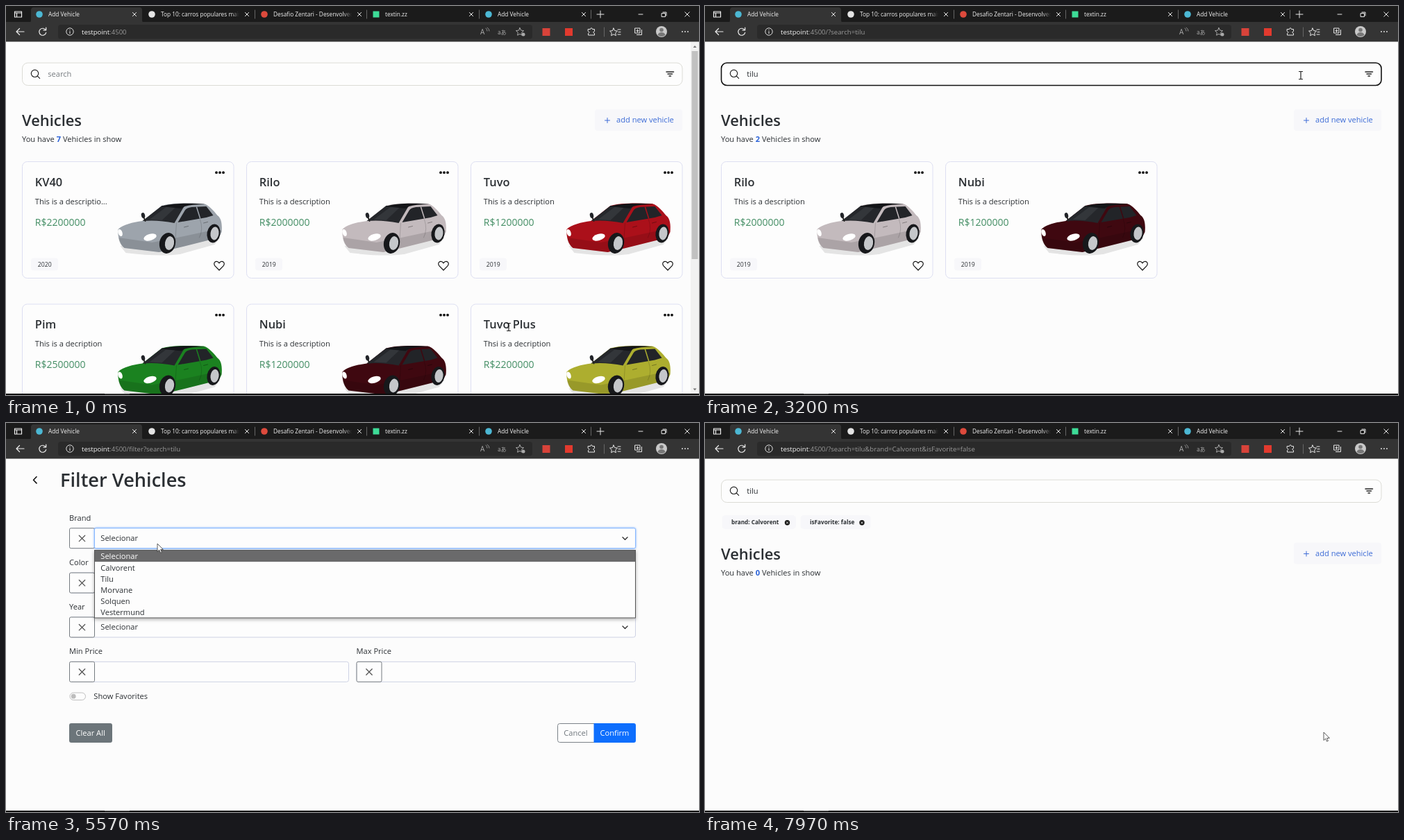
Write an HTML page that moves like this. It is 998 by 561 pixels and loops after 8 s.

```html
<!DOCTYPE html>
<html lang="en">
<head>
<meta charset="utf-8">
<title>Vehicle list</title>
<style>
html, body { margin: 0; width: 100%; height: 100%; overflow: hidden; background: #fcfcfc; }
svg { display: block; }
text { font-family: "Open Sans", "Noto Sans", sans-serif; fill: #2b2f33; white-space: pre; }
.tab text { font-size: 8.3px; fill: #f2f2f2; }
.line { fill: none; stroke-linecap: round; stroke-linejoin: round; }
</style>
</head>
<body>
<svg id="stage" width="100%" height="100%" viewBox="0 0 998 561"></svg>
<script>
const LOOP = 8000;
const HOST = 'testpoint', PORT = ':4500';
const BRANDS = ['Selecionar', 'Calvorent', 'Tilu', 'Morvane', 'Solquen', 'Vestermund'];
const QUERY = 'tilu', KEY_TIMES = [1700, 2170, 2290, 2400];
const FOCUS = 1250, RESULTS = 2790, FILTER = 3680, OPEN = 5390, PICK = 6680, CONFIRM = 7480;

// Pointer stops: time, x, y
const PATH = [
  [0, 724, 463], [90, 724, 463], [830, 367, 92], [970, 367, 90], [1200, 367, 96],
  [2770, 367, 96], [3200, 858, 100], [3520, 951, 97], [4200, 951, 97], [4430, 926, 108],
  [4500, 911, 119], [4700, 911, 119], [5280, 218, 174], [5600, 218, 174], [6000, 216, 223],
  [6330, 214.5, 206], [6720, 214.5, 206], [7170, 880, 421], [7300, 891, 446], [8000, 891, 446]
];

const text = (x, y, size, str, more = '') => `<text x="${x}" y="${y}" font-size="${size}" ${more}>${str}</text>`;
const rect = (x, y, w, h, fill, more = '') => `<rect x="${x}" y="${y}" width="${w}" height="${h}" fill="${fill}" ${more}/>`;
const circle = (x, y, r, fill, more = '') => `<circle cx="${x}" cy="${y}" r="${r}" fill="${fill}" ${more}/>`;
const oval = (x, y, rx, ry, fill, turn = 0) =>
  `<ellipse rx="${rx}" ry="${ry}" fill="${fill}" transform="translate(${x} ${y}) rotate(${turn})"/>`;
const shape = (d, fill, more = '') => `<path d="${d}" fill="${fill}" ${more}/>`;
const line = (d, color = '#e8e8e8', width = 1) => `<path class="line" d="${d}" stroke="${color}" stroke-width="${width}"/>`;
const cross = (x, y, r, color, width) => line(`M${x - r} ${y - r}l${2 * r} ${2 * r}m0 ${-2 * r}l${-2 * r} ${2 * r}`, color, width);
const group = (id, body) => `<g id="${id}">${body}</g>`;
const at = (x, y, body) => `<g transform="translate(${x} ${y})">${body}</g>`;

function tab(x, title, icon, fade) {
  return icon + `<svg x="${x + 25}" y="0" width="113" height="24">${text(0, 15, 8.3, title)}` +
    (fade ? rect(101, 3, 12, 18, 'url(#fade)') : '') + '</svg>' + cross(x + 149, 12, 2.6, '#eee', 1);
}

function browser() {
  const dot = (x, color) => circle(x, 12, 4.8, color);
  const tabs = rect(0, 0, 998, 24, '#1b1b1b') +
    shape('M33 24Q36 24 36 20V6Q36 2 40 2H192Q196 2 196 6V20Q196 24 199 24Z', '#343434') +
    line('M12.5 8h10v8h-10zM12.5 10h10M15.5 10v6', '#eee', 1.2) +
    tab(36, 'Add Vehicle', dot(48, '#4cb8d4')) +
    tab(198, 'Top 10: carros populares mais vendidos', dot(210, '#e4e4e4'), true) +
    tab(360, 'Desafio Zentari - Desenvolvedor', dot(372, '#dd4a3c'), true) +
    tab(521, 'textin.zz', rect(528.5, 7.5, 9, 9, '#3ddc97')) +
    tab(683, 'Add Vehicle', dot(695, '#4cb8d4')) +
    [358.5, 519.5, 681.5, 842.5].map(x => line(`M${x} 6v12`, '#666')).join('') +
    line('M851 12h10M856 7v10') + line('M911 12h6') +
    line('M944.5 10.5h5v5h-5zM946 9h5v5') + cross(981, 12, 3.2, '#eee', 1);
  const star = 'l1.7 3.6 3.8 .5-2.8 2.7.7 3.9-3.4-1.9-3.4 1.9.7-3.9-2.8-2.7 3.8-.5z';
  const bar = rect(0, 23, 998, 28.5, '#343434') + rect(75, 27, 683, 20.5, '#2a2a2a', 'rx="4"') +
    line('M26 37H15m4.5-4.5L15 37l4.5 4.5', '#eee', 1.2) +
    line('M57 34.5a5 5 0 1 0 .7 3.8M57.7 31v3.8H54', '#eee', 1.2) +
    circle(92, 37, 5.2, 'none', 'stroke="#ddd"') + line('M92 36.5v3M92 34.3v.1', '#ddd', 1.1) +
    `<text x="109" y="40.8" font-size="9.6" style="fill:#f4f4f4">${HOST}<tspan id="url" fill="#9a9a9a"></tspan></text>` +
    text(683, 41, 10, 'A', 'style="fill:#aaa"') + line('M691 32q2 1.5 2 4M693 31q3 2 3 5', '#aaa', .8) +
    text(708, 40.5, 8, 'aあ', 'style="fill:#aaa;font-family:\'Noto Sans CJK JP\',\'Noto Sans CJK\',sans-serif"') +
    line('M740 31.5' + star, '#aaa') + circle(745, 41, 2.5, '#aaa') +
    rect(772.5, 32, 11, 11, '#d8433a') + rect(805, 32, 11, 11, '#e23a2e') +
    line('M838.5 33.5h3q1.5-4 3 0h3v3q-3.5 1.5 0 3v2.5h-9v-2.5q3-1.5 0-3z') + line('M861.5 31v13', '#666') +
    line('M875 32' + star) + line('M881 34h4M882 37.5h3M881 41h4') +
    line('M906 32h7v7h-7zM908.5 41.5h7v-7M909.5 34v3.5M907.8 35.8h3.5') +
    circle(944, 37, 8, '#c9c9c9') + circle(944, 34.5, 2.8, '#777') + shape('M938.5 42q1-4 5.5-4t5.5 4q-5.5 4-11 0z', '#777') +
    [974, 978, 982].map(x => circle(x, 37, .9, '#eee')).join('');
  return `<g class="tab">${tabs}</g>` + bar + rect(0, 559, 998, 2, '#0c0c0c') + rect(142, 559, 36, 1, '#5a5a5a');
}

// Drawn in a box of 151 by 74 units
function car(color) {
  return shape('M4 62L12 72Q60 78 90 74L140 60L148 50L60 50Z', '#e4e4e4') +
    shape('M1 38C8 31 22 28 36 26L64 4C76 0 100 0 124 1C132 3 140 13 144 18C150 22 151 32 150 42L146 50L86 65L60 71L10 65C3 60 0 48 1 38Z', color) +
    shape('M2 50L50 57L86 50L142 38L150 40L146 50L86 65L60 71L10 65C4 60 2 56 2 50Z', '#000', 'opacity=".12"') +
    shape('M36 26L64 4L96 5L82 29Q58 24 36 26Z', '#25272b') +
    shape('M46 24L70 6L84 6L64 25Z', '#3d4045', 'opacity=".6"') +
    shape('M63 5C78 0 108 0 126 2Q106 2 97 5L92 8Z', '#141518') +
    shape('M87 28L97 11Q99 7 107 6L128 5L138 18L128 21Z', '#222428') +
    line('M114 6L119 22', color, 1.5) + line('M85 29L83 58M119 24Q124 38 118 50', '#0003', .8) +
    line('M96 35l6-1.5M124 29l6-1.5', '#0005', 1) +
    oval(37, 18, 2.6, 4, '#222429', -15) + line('M38 21l2 5', '#222', 2) +
    oval(72, 58, 11.5, 15, '#17181b', 12) + oval(75, 58, 6.5, 10, '#c5c7ca', 10) +
    oval(138.5, 44, 9.5, 13.5, '#17181b', 10) + oval(140, 44, 6, 9.5, '#c5c7ca', 8) +
    oval(47, 49.5, 9.5, 4.6, '#fff', -16) + oval(4, 43, 3, 5.2, '#fff', -20);
}

function card(col, row, name, note, price, year, color) {
  return at(23.5 + col * 323, 224.5 + row * 205.5,
    rect(0, 0, 304.5, 168, '#fdfdfd', 'rx="7" stroke="#dddff2"') +
    text(18.3, 35, 16.4, name, 'font-weight="600"') + text(18.3, 61, 11.1, note) +
    text(18.3, 92.3, 14, 'R$' + price, 'style="fill:#428d63"') +
    [279.5, 284.5, 289.5].map(x => circle(x, 15.7, 1.9, '#111')).join('') +
    rect(12.5, 139, 39, 18, '#f7f7fa', 'rx="4"') + text(22.3, 151.5, 8.7, year) +
    line('M283.5 156.5L277.5 150.3C273.5 145.5 280 141 283.5 146.3C287 141 293.5 145.5 289.5 150.3Z', '#111', 1.2) +
    at(137, 59.5, car(color)));
}

const FULL = 'This is a description';
const models = {
  kv: ['KV40', 'This is a descriptio...', 2200000, 2020, '#9da4ac'],
  rilo: ['Rilo', FULL, 2000000, 2019, '#c3babd'],
  tuvo: ['Tuvo', FULL, 1200000, 2019, '#ab101a'],
  pim: ['Pim', 'This is a decription', 2500000, 2020, '#1b8220'],
  nubi: ['Nubi', FULL, 1200000, 2019, '#3f0810'],
  plus: ['Tuvo Plus', 'Thsi is a decription', 2200000, 2020, '#adae2f']
};
const cards = keys => keys.map((k, i) => card(i % 3, i / 3 | 0, ...models[k])).join('');

function home() {
  const search = rect(23.5, 82, 950.5, 32.5, '#fdfdfd', 'id="box" rx="8"') +
    circle(41.5, 97.3, 5.2, 'none', 'stroke="#222" stroke-width="1.2"') + line('M45.4 101.2l3.2 3.2', '#222', 1.2) +
    text(60.3, 102, 11.1, '', 'id="query"') + rect(0, 91, .9, 14, '#111', 'id="caret"') +
    line('M951 95h10.5M953 98h6.5M955 101h2.5', '#222', 1.5);
  const head = text(23, 173, 21.9, 'Vehicles', 'font-weight="600"') +
    `<text x="23" y="196.4" font-size="11.1">You have <tspan id="count" fill="#2a62d8" font-weight="700"></tspan> Vehicles in show</text>` +
    rect(848, 149, 126, 31, '#f7f7fa', 'rx="4"') + line('M862.5 165h7M866 161.5v7', '#3c6bd6', 1) +
    text(879, 168, 11.1, 'add new vehicle', 'style="fill:#3c6bd6"');
  const chip = (x, w, str) => rect(x, 133, w, 20, '#f7f7fa', 'rx="5"') + text(x + 13.5, 146.3, 8.2, str, 'font-weight="700"') +
    circle(x + w - 12.5, 143.8, 3.7, '#161616') + cross(x + w - 12.5, 143.8, 1.2, '#fff', .8);
  const bar = rect(986, 52, 12, 507, '#f1f1f1') + rect(987.5, 65, 9, 300, '#c1c1c1') +
    shape('M989.5 60h5l-2.5-3zM989.5 551.5h5l-2.5 3z', '#777');
  return search + group('head', head) +
    group('chips', chip(24.5, 106.5, `brand: ${BRANDS[1]}`) + chip(137.5, 101, 'isFavorite: false')) +
    group('all', cards(Object.keys(models)) + bar) + group('some', cards(['rilo', 'nubi']));
}

function filterPage() {
  const field = (x, y, right, label) => text(x, y - 11, 11.1, label) +
    rect(x + .5, y, right - x, 29, '#fdfdfd', 'rx="3" stroke="#ced2e4"') +
    rect(x + .5, y, 36, 29, '#fdfdfd', 'rx="2" stroke="#757b80"') + cross(x + 18.5, y + 14.7, 4.2, '#555', 1.3);
  const pick = (y, label, id) => field(91, y, 906, label) + (id ? rect(127.5, y, 779, 29, '#fdfdfd', 'id="ring" rx="2" stroke="#86b7fe"') : '') +
    text(136.3, y + 18.4, 11.1, 'Selecionar', id ? `id="${id}"` : '') + line(`M888 ${y + 13}l3.5 3.5 3.5-3.5`, '#333', 1.4);
  const list = rect(127.5, 183.5, 779, 97.5, '#fdfdfd', 'stroke="#555" filter="url(#shadow)"') +
    rect(128, 184, 778, 16.1, '#6a6a6b', 'id="hover"') +
    BRANDS.map((b, i) => text(136.3, 196.4 + i * 16.1, 11.1, b, 'class="option"')).join('');
  return line('M44 77.5l-4.5 4.7 4.5 4.7', '#111', 1.6) + text(78, 92, 27.2, 'Filter Vehicles', 'font-weight="600"') +
    pick(151.7, 'Brand', 'brand') + pick(216, 'Color') + pick(280, 'Year') +
    field(91, 344.3, 493, 'Min Price') + field(504.5, 344.3, 906, 'Max Price') +
    rect(92, 389, 22.5, 10.5, '#fdfdfd', 'rx="5.2" stroke="#bfbfbf"') + circle(97.2, 394.2, 3.4, '#bdbdbd') +
    text(126.3, 398.2, 11.1, 'Show Favorites') +
    rect(91, 433, 62, 28, '#6c757a', 'rx="3"') + text(100.5, 451.3, 11.1, 'Clear All', 'style="fill:#fff"') +
    rect(794.5, 433.5, 56, 27, '#fdfdfd', 'rx="3" stroke="#7b8288"') + text(803.3, 451.3, 11.1, 'Cancel', 'style="fill:#70777d"') +
    shape('M846.5 433H904q3 0 3 3v22q0 3-3 3h-57.5z', '#0d6efd') + text(855.5, 451.3, 11.1, 'Confirm', 'style="fill:#fff"') +
    group('list', list);
}

const stage = document.getElementById('stage');
stage.innerHTML = `<defs>
  <linearGradient id="fade"><stop stop-color="#1b1b1b" stop-opacity="0"/><stop offset="1" stop-color="#1b1b1b"/></linearGradient>
  <filter id="shadow" x="-5%" y="-10%" width="110%" height="125%"><feDropShadow dx="0" dy="2" stdDeviation="2.5" flood-opacity=".3"/></filter>
  </defs>` + rect(0, 0, 998, 561, '#fcfcfc') + group('home', home()) + group('filter', filterPage()) + browser() +
  group('pointer',
    group('arrow', shape('M0 0V11.6L2.7 9.1 4.5 13.2 6.4 12.4 4.7 8.4H8.3Z', '#fff', 'stroke="#333" stroke-width=".8"')) +
    group('beam', line('M-2.5-5.5h5M0-5.5v11M-2.5 5.5h5', '#222', 1.2)));

const el = {};
stage.querySelectorAll('[id]').forEach(n => el[n.id] = n);
const options = [...stage.querySelectorAll('.option')];
const show = (node, on) => node.setAttribute('display', on ? 'inline' : 'none');
const write = (node, str) => { if (node.textContent !== str) node.textContent = str; };

function pointerAt(t) {
  const i = PATH.findIndex(p => p[0] > t);
  const [t0, x0, y0] = PATH[i - 1], [t1, x1, y1] = PATH[i];
  const k = (t - t0) / (t1 - t0), e = k * k * (3 - 2 * k);
  return [x0 + (x1 - x0) * e, y0 + (y1 - y0) * e];
}

function drawSearch(t) {
  const focused = t >= FOCUS && t < FILTER;
  const typed = KEY_TIMES.filter(k => t >= k).length;
  write(el.query, typed ? QUERY.slice(0, typed) : 'search');
  el.query.style.fill = typed ? '#2b2f33' : '#777c80';
  el.box.setAttribute('stroke', focused ? '#111' : '#dcdcd6');
  el.box.setAttribute('stroke-width', focused ? 1.6 : 1);
  const since = t - (typed ? KEY_TIMES[typed - 1] : FOCUS);
  show(el.caret, focused && since % 1060 < 530);
  el.caret.setAttribute('x', 60.5 + (typed ? el.query.getComputedTextLength() : 0));
}

function drawList(t, y) {
  const open = t >= OPEN && t < PICK;
  const row = Math.max(0, Math.min(5, Math.floor((y - 184) / 16.1)));
  show(el.list, open);
  show(el.ring, t >= OPEN);
  el.ring.style.filter = 'drop-shadow(0 0 1.5px #6fa8fe)';
  el.hover.setAttribute('y', 184 + row * 16.1);
  options.forEach((o, i) => o.style.fill = i === row ? '#fff' : '#2b2f33');
  write(el.brand, BRANDS[t >= PICK ? 1 : 0]);
}

function render(t) {
  const page = t < RESULTS ? 'all' : t < FILTER ? 'some' : t < CONFIRM ? 'filter' : 'none';
  const [x, y] = pointerAt(t), onFilter = page === 'filter';
  show(el.home, !onFilter);
  show(el.filter, onFilter);
  show(el.all, page === 'all');
  show(el.some, page === 'some');
  show(el.chips, page === 'none');
  el.head.setAttribute('transform', `translate(0 ${page === 'none' ? 23.6 : 0})`);
  write(el.count, { all: '7', some: '2' }[page] || '0');
  const search = `?search=${QUERY}`;
  write(el.url, PORT + {
    all: '', some: '/' + search, filter: '/filter' + search,
    none: `/${search}&brand=${BRANDS[1]}&isFavorite=false`
  }[page]);
  drawSearch(t);
  drawList(t, y);

  const beam = !onFilter && (t < 90 || (x > 58 && x < 940 && y > 83 && y < 114));
  show(el.pointer, t < KEY_TIMES[0] || t >= RESULTS);
  el.pointer.setAttribute('transform', `translate(${x} ${y})`);
  show(el.beam, beam);
  show(el.arrow, !beam);
}

function tick() {
  render(performance.now() % LOOP);
  requestAnimationFrame(tick);
}
tick();
</script>
</body>
</html>
```
